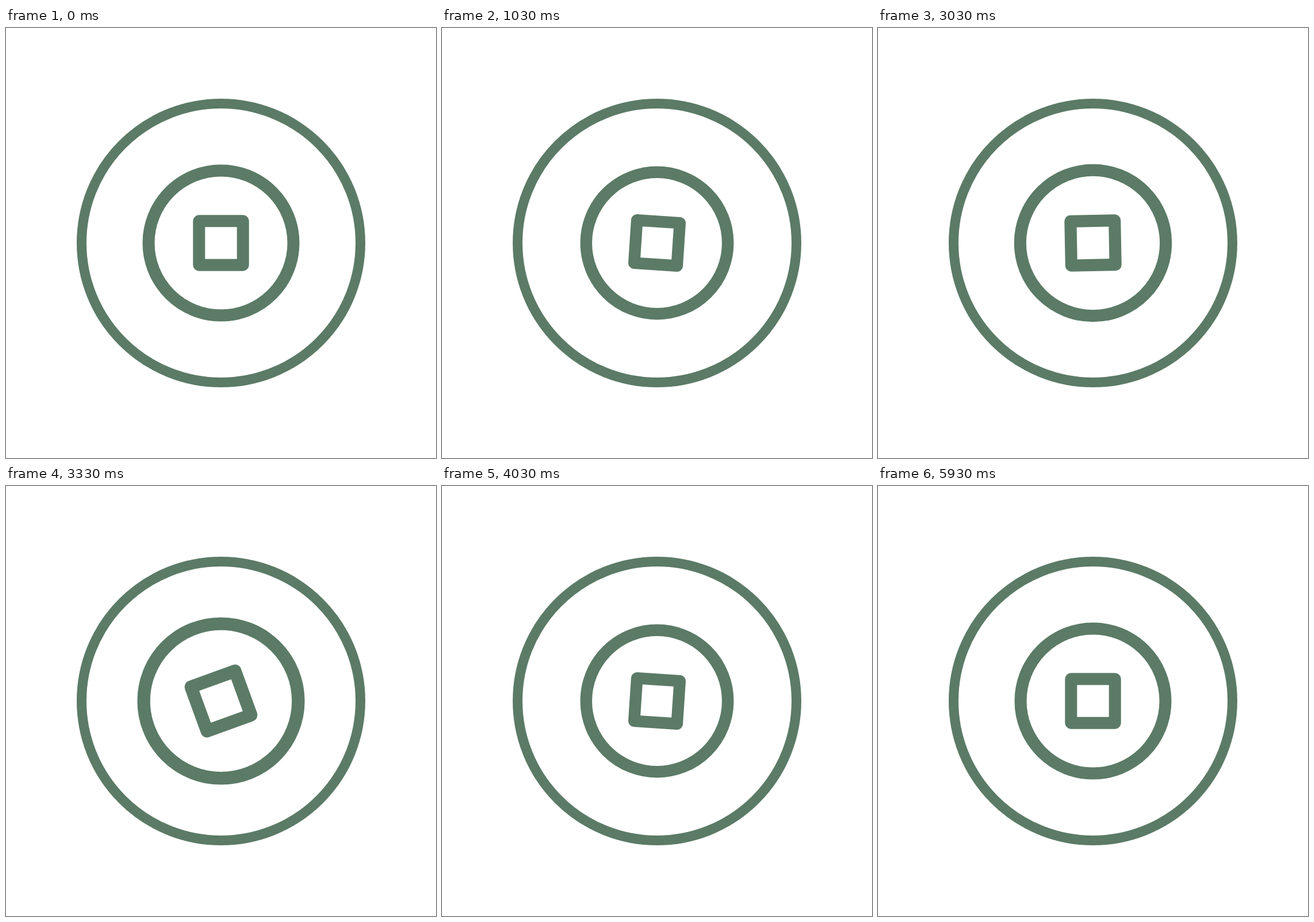
These frames come from a looping animation (748 px wide and 748 px high, 6.01 s). An HTML page:

```html
<!DOCTYPE html>
<html lang="en">
<head>
<meta charset="utf-8">
<title>Coin</title>
<style>
  html, body { margin: 0; width: 100%; height: 100%; overflow: hidden; background: #fff; }
  svg { display: block; width: 100%; height: 100%; }
</style>
</head>
<body>
<svg viewBox="-374 -374 748 748" fill="none" stroke="#5b7b66" stroke-width="21" stroke-linejoin="round">
  <circle r="242.5" stroke-width="17"/>
  <g id="core">
    <circle r="126"/>
    <rect id="hole" x="-38.2" y="-38.2" width="76.4" height="76.4"/>
  </g>
</svg>
<script>
const LOOP = 6010, CYCLE = 3000;
const core = document.getElementById('core');
const hole = document.getElementById('hole');

// Keys are [ms, value]
const SCALE = [[0, 1], [300, 1.077], [600, 0.9375], [1350, 1]];
const ANGLE = [[0, 0], [350, -20], [650, 98.5], [1400, 90]];

const ease = u => u * u * (3 - 2 * u);

function valueAt(keys, t) {
  const i = keys.findIndex(key => key[0] > t);
  if (i < 0) return keys[keys.length - 1][1];
  const [t0, a] = keys[i - 1], [t1, b] = keys[i];
  return a + (b - a) * ease((t - t0) / (t1 - t0));
}

// Poses are 50 ms apart, shown at 0 and 30 ms of every tenth of a second
function poseTime(t) {
  return Math.floor(t / 100) * 100 + (t % 100 >= 30 ? 50 : 0);
}

function draw(now) {
  const t = poseTime(now % LOOP) % CYCLE;
  core.setAttribute('transform', `scale(${valueAt(SCALE, t)})`);
  hole.setAttribute('transform', `rotate(${valueAt(ANGLE, t)})`);
}

function tick() {
  draw(performance.now());
  requestAnimationFrame(tick);
}
tick();
</script>
</body>
</html>
```
